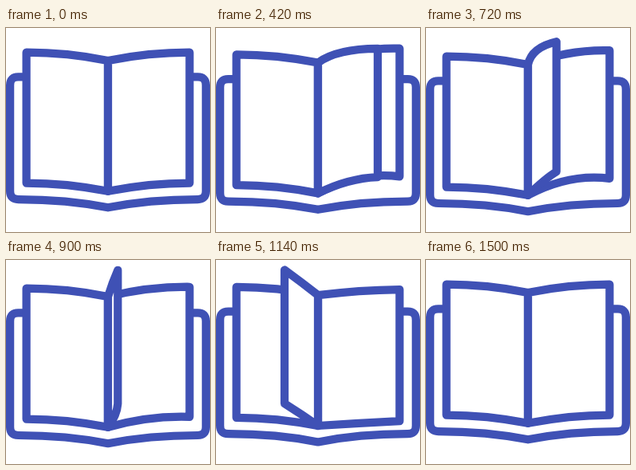
An HTML page for the animation above (1.68 s loop, 256 by 256 pixels).

```html
<!DOCTYPE html>
<html lang="en">
<head>
<meta charset="utf-8">
<title>Turning page</title>
<style>
  html, body { margin: 0; width: 100%; height: 100%; overflow: hidden; background: #fff; }
  svg { display: block; width: 100vw; height: 100vh; }
  path { fill: #fff; stroke: #3f51b5; stroke-width: 2; stroke-linejoin: round; stroke-linecap: round; }
</style>
</head>
<body>
<svg viewBox="0 0 50 50">
  <g id="book">
    <path d="M4 12H3Q1 12 1 14V40Q1 42 3 42Q15 42 25 44Q35 42 47 42Q49 42 49 40V14Q49 12 47 12H46"/>
    <path id="left"/>
    <path id="right"/>
    <path id="turn"/>
  </g>
</svg>
<script>
const LOOP = 1680, HOLD = 180, STEP = 60, LAST = 23;
const SPINE = 25, LEFT = 5, RIGHT = 45;
const TOP = 6, BOTTOM = 38, DIP = 2;
const $ = id => document.getElementById(id);

// [step, x] of the turning edge
const edge = [[0, RIGHT], [3, 43], [7, 36], [13, 27.4], [17, 16.8], [LAST, LEFT]];

function slope(i) {
  const a = edge[i - 1], b = edge[i + 1];
  return a && b ? (b[1] - a[1]) / (b[0] - a[0]) : 0;
}

function edgeAt(k) {
  const i = Math.max(1, edge.findIndex(p => p[0] >= k));
  const [k0, x0] = edge[i - 1], [k1, x1] = edge[i];
  const span = k1 - k0, u = (k - k0) / span, v = 1 - u;
  return x0 + (x1 - x0) * u * u * (3 - 2 * u) +
    span * u * v * (slope(i - 1) * v - slope(i) * u);
}

function page(id, x, top, bottom, topBend, bottomBend) {
  $(id).setAttribute('d',
    `M${SPINE} ${TOP + DIP}Q${topBend} ${x} ${top}V${bottom}` +
    `Q${bottomBend} ${SPINE} ${BOTTOM + DIP}Z`);
}

// The page below is pulled up first, then sags and settles
function drawRight(swing) {
  const up = 2.8 * swing, rise = 4 * swing, mid = (SPINE + RIGHT) / 2;
  page('right', RIGHT, TOP - up, BOTTOM - rise,
    [mid, TOP - 1.2 * up], [mid, BOTTOM - 1.6 * rise]);
}

function drawTurn(k, u, swing) {
  const x = edgeAt(k), mid = (SPINE + x) / 2;
  const curl = Math.max(0, swing) ** 2;
  const arc = Math.sin(Math.PI * u ** 1.5);
  const top = TOP - 4.6 * arc;
  const bottom = BOTTOM - 3.8 * arc - 2.8 * curl;
  const bow = Math.cos(Math.PI * u) ** 6 + 5.3 * curl;
  const fold = 1.2 * Math.sin(Math.PI * u) ** 8;
  page('turn', x, top, bottom,
    [mid - 9.4 * curl, (top + TOP + DIP) / 2 - bow],
    [mid + fold, (bottom + BOTTOM + DIP) / 2 - bow]);
}

function draw(now) {
  const t = now % LOOP;
  const k = t < HOLD ? 0 : Math.min(LAST, Math.floor((t - HOLD) / STEP) + 1);
  const u = k / LAST;
  const swing = (1 - u) * Math.sin(2 * Math.PI * u ** 1.4);
  const drop = Math.abs(Math.sin(Math.PI * u)) ** 1.5;
  $('book').setAttribute('transform', `translate(0 ${drop.toFixed(3)})`);
  drawRight(swing);
  drawTurn(k, u, swing);
  $('turn').style.display = k % LAST ? '' : 'none';
}

page('left', LEFT, TOP, BOTTOM, [15, TOP], [15, BOTTOM]);
const start = performance.now();
function tick() {
  draw(performance.now() - start);
  requestAnimationFrame(tick);
}
tick();
</script>
</body>
</html>
```
